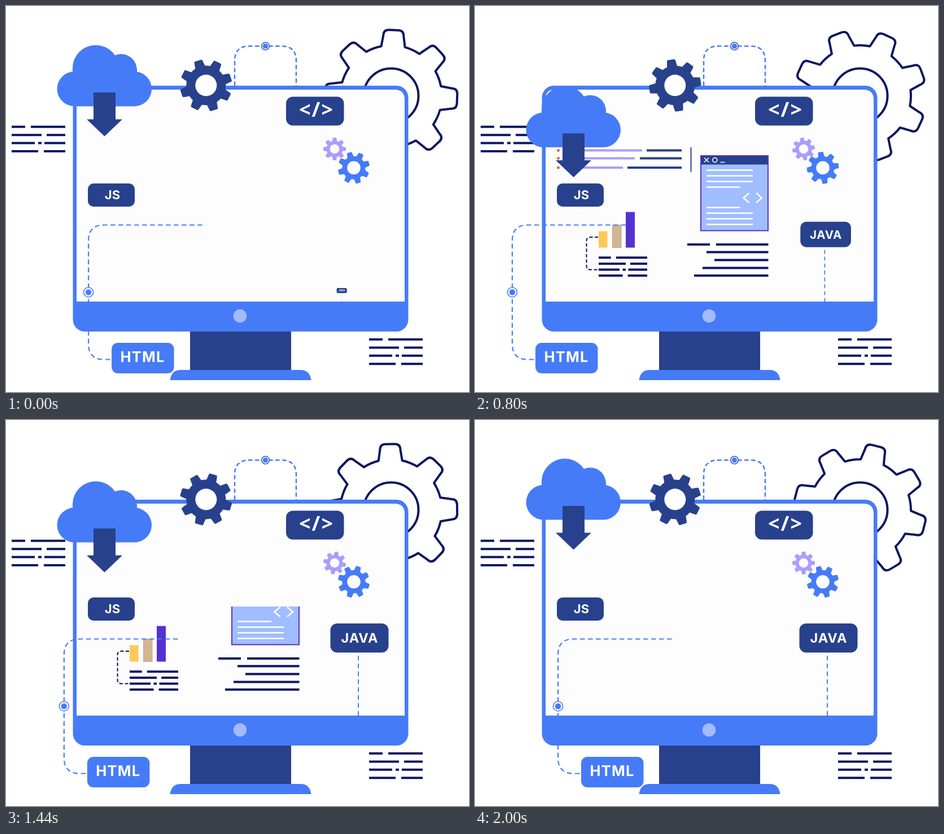
An HTML page for the animation above (2.04 s loop, 820 px wide and 683 px high).

```html
<!DOCTYPE html>
<html lang="en">
<head>
<meta charset="utf-8">
<title>Code monitor</title>
<style>
  html, body { margin: 0; width: 100%; height: 100%; overflow: hidden; background: #fff; }
  svg { display: block; width: 820px; height: 683px; }
  text { font-family: Inter, "Open Sans", sans-serif; font-weight: 700; fill: #fff; text-anchor: middle; }
  .blue { fill: #467bf8; }
  .dark { fill: #28418c; }
  .navy { stroke: #0b1560; fill: none; }
  .wire { stroke: #467bf8; fill: none; }
  .bars { stroke-width: 4; fill: none; }
  .white { stroke: #fff; fill: none; }
</style>
</head>
<body>
<svg viewBox="0 0 820 683">
  <defs>
    <clipPath id="screen"><rect x="125" y="148" width="581" height="375"/></clipPath>
    <clipPath id="wipe"><rect id="wipeBox" x="125" y="522" width="581" height="400"/></clipPath>
  </defs>

  <path id="bigGear" class="navy" stroke-width="4" stroke-linejoin="round"/>
  <circle class="navy" cx="682" cy="159" r="48.5" stroke-width="4"/>

  <path class="wire" stroke-width="2.5" stroke-dasharray="7.5 4.5" d="M405 141V97Q405 71 431 71H488Q514 71 514 97V141"/>
  <circle cx="459.5" cy="71" r="6.8" fill="#fff" stroke="#3157b5" stroke-width="1.6"/>
  <circle class="blue" cx="459.5" cy="71" r="4.6"/>

  <!-- monitor -->
  <rect class="dark" x="326" y="570" width="179" height="76"/>
  <path class="blue" d="M290.500 662Q293 644 309 644H522Q538 644 540.500 662Z"/>
  <rect class="blue" x="118.500" y="141" width="594" height="435" rx="21"/>
  <path fill="#fdfdfe" d="M125 523V164Q125 148 141 148H688Q706 148 706 166V523Z"/>
  <circle cx="414.500" cy="548.500" r="11.800" fill="#a3bbfb"/>

  <path id="leftLines" class="navy bars"/>
  <path id="rightLines" class="navy bars"/>

  <!-- screen content -->
  <g clip-path="url(#wipe)">
    <g fill="#cf6a55">
      <circle cx="147.500" cy="255.500" r="2.500"/><circle cx="147.500" cy="269.500" r="2.500"/><circle cx="147.500" cy="286" r="2.500"/>
    </g>
    <path class="bars" stroke="#ab9cff" d="M160 255.500H296M160 269.500H283M160 286H262"/>
    <path class="bars" stroke="#28418c" d="M304 255.500H366M292 269.500H366M270 286H366"/>
    <path stroke="#28418c" stroke-width="2" d="M382.500 250V293.500"/>

    <rect x="400" y="265" width="119" height="132.500" fill="#a0bdff"/>
    <rect class="dark" x="400" y="265" width="119" height="15.500"/>
    <rect x="400" y="265" width="119" height="132.500" fill="none" stroke="#5332d1" stroke-width="2"/>
    <path class="white" stroke-width="1.600" d="M406 268.500L414 276.500M414 268.500L406 276.500M434.500 276.500H442.500"/>
    <circle class="white" cx="424.800" cy="272.500" r="4" stroke-width="1.600"/>
    <path class="white" stroke-width="2.600" d="M410 290.500H492M410 300.500H492M410 310.500H492M410 320.500H470M410 356.500H470M410 366.500H492M410 376.500H492M410 386.500H492"/>
    <path class="white" stroke-width="2.600" d="M485.500 331L475.500 339.500L485.500 348M498 331L508 339.500L498 348"/>

    <rect x="219" y="398.500" width="15.500" height="29" fill="#ffc857"/>
    <rect x="243.500" y="387.500" width="15.500" height="40" fill="#d3b58f" stroke="#b59a99" stroke-width=".8"/>
    <rect x="267" y="364.500" width="16" height="63" fill="#5332d1"/>
    <path class="navy" stroke-width="2" stroke-dasharray="6 3.500" d="M218 409H204Q197.500 409 197.500 416V460Q197.500 466.500 204 466.500H219"/>
    <path id="chartLines" class="navy bars"/>
    <path class="navy bars" d="M376 422H416M427 422H519.500M410 435.500H519.500M424 449.500H519.500M403 463.500H519.500M388 477H519.500"/>
  </g>

  <g clip-path="url(#screen)">
    <g id="java">
      <path class="wire" stroke-width="2" stroke-dasharray="8 6" d="M624 417V530"/>
      <rect class="dark" x="574.500" y="360" width="103" height="51.500" rx="12"/>
      <text x="626.500" y="394.300" font-size="23.500" letter-spacing=".9">JAVA</text>
    </g>
  </g>

  <path id="darkGear" class="dark"/>
  <circle cx="354.300" cy="140.500" r="19" fill="#fff"/>
  <path id="lilacGear" fill="#ab9cff"/>
  <circle cx="582" cy="253" r="8.300" fill="#fdfdfe"/>
  <path id="blueGear" class="blue"/>
  <circle cx="616" cy="286.300" r="11.800" fill="#fdfdfe"/>

  <rect class="dark" x="496" y="160.500" width="102.500" height="51" rx="12"/>
  <text x="550" y="196" font-size="36" letter-spacing="2" style="font-family:'Open Sans',sans-serif">&lt;/&gt;</text>

  <g id="html">
    <path class="wire" stroke-width="2.200" stroke-dasharray="8.500 5.500" d="M348 387.500H174Q146.500 387.500 146.500 415V598Q146.500 625.500 174 625.500H188"/>
    <circle cx="146.500" cy="506.500" r="8.500" fill="#fff" stroke="#467bf8" stroke-width="1.600"/>
    <circle class="blue" cx="146.500" cy="506.500" r="5.200"/>
    <rect class="blue" x="187.500" y="596" width="110.500" height="54" rx="11"/>
    <text x="242.500" y="630" font-size="25.500" letter-spacing="1.200">HTML</text>
  </g>

  <g id="cloud">
    <g class="blue">
      <circle cx="159" cy="110" r="41.200"/><circle cx="204" cy="112.500" r="27.800"/>
      <rect x="90.500" y="115.500" width="167.500" height="61.500" rx="30.700"/>
      <rect x="118" y="110" width="114" height="50"/>
    </g>
    <path class="dark" d="M155 152.500H194V200H206L174.500 230L143 200H155Z"/>
  </g>

  <rect class="dark" x="145" y="314" width="83" height="41" rx="10"/>
  <text x="188.500" y="342" font-size="22">JS</text>
</svg>

<script>
const LOOP = 2040, STEP = 40;
const $ = id => document.getElementById(id);

// Four rows of a text block: [from, to] pairs within a width of 95.
const ROWS = [[0, 24, 34, 95], [0, 53, 62, 95], [0, 41, 47, 53, 58, 95], [0, 47, 57, 95]];
function textBlock(id, x, y, width, gap) {
  const k = width / 95;
  let d = "";
  ROWS.forEach((row, r) => {
    for (let i = 0; i < row.length; i += 2)
      d += `M${x + row[i] * k} ${y + r * gap}H${x + row[i + 1] * k}`;
  });
  $(id).setAttribute("d", d);
}
textBlock("leftLines", 10, 213.8, 95, 14.4);
textBlock("rightLines", 643, 590, 95, 14.4);
textBlock("chartLines", 219, 445.3, 86, 10.6);

// Eight-toothed gear: body radius, tip radius, half widths at foot and tip, corner.
function gear(id, body, tip, foot, top, corner) {
  const y = -Math.sqrt(body * body - foot * foot);
  let d = "";
  for (let i = 0; i < 8; i++) {
    const a = i * Math.PI / 4, c = Math.cos(a), s = Math.sin(a);
    const p = (px, py) => `${(px * c - py * s).toFixed(2)} ${(px * s + py * c).toFixed(2)} `;
    d += (i ? `A${body} ${body} 0 0 1 ` : "M") + p(-foot, y)
      + "L" + p(-top, corner - tip) + "Q" + p(-top, -tip) + p(corner - top, -tip)
      + "L" + p(top - corner, -tip) + "Q" + p(top, -tip) + p(top, corner - tip)
      + "L" + p(foot, y);
  }
  $(id).setAttribute("d", d + `A${body} ${body} 0 0 1 ${-foot} ${y}Z`);
}
gear("bigGear", 90, 117, 21, 18, 10);
gear("darkGear", 35, 46, 9, 7.6, 2.5);
gear("blueGear", 20.5, 28.2, 5.6, 4.6, 1.5);
gear("lilacGear", 14.5, 20, 4, 3.3, 1);

const SWAY = [[0, .005], [320, .256], [520, .581], [800, .936], [930, 1],
  [1120, .915], [1280, .721], [1600, .314], [2000, -.006]];
const TURN = [[0, 2.3], [320, 10.8], [520, 16.3], [800, 24.7], [1280, 40.3], [1600, 48], [2000, 59.2]];

function segment(keys, t) {
  let i = 0;
  while (i < keys.length - 2 && t >= keys[i + 1][0]) i++;
  return i;
}
function linear(keys, t) {
  const i = segment(keys, t), [a, v] = keys[i], [b, w] = keys[i + 1];
  return v + (w - v) * (t - a) / (b - a);
}
function smooth(keys, t) {
  const i = segment(keys, t), [a, v] = keys[i], [b, w] = keys[i + 1];
  const slope = j => j === 0 || j === keys.length - 1 ? 0
    : (keys[j + 1][1] - keys[j - 1][1]) / (keys[j + 1][0] - keys[j - 1][0]);
  const h = b - a, u = (t - a) / h, q = 1 - u;
  return v * (1 + 2 * u) * q * q + w * u * u * (3 - 2 * u)
    + h * (slope(i) * u * q * q - slope(i + 1) * u * u * q);
}
const place = (id, value) => $(id).setAttribute("transform", value);

function draw(t) {
  const sway = smooth(SWAY, t), spin = t * .18;
  place("cloud", `translate(0 ${78 * sway})`);
  place("html", `translate(${-86 * sway} 0)`);
  place("bigGear", `translate(682 159.5) rotate(${linear(TURN, t)})`);
  place("darkGear", `translate(354.3 140.5) rotate(${spin - 18})`);
  place("blueGear", `translate(616 286.3) rotate(${spin - 17})`);
  place("lilacGear", `translate(582 253) rotate(${-spin})`);

  const grow = (1 - Math.cos(Math.PI * Math.min(t / 1080, 1))) / 2;
  place("java", `translate(588 528.5) scale(${.175 + .825 * grow}) translate(-588 -528.5)`);

  const edge = t < 1000 ? 522.4 - .345 * t : 287 + .269 * (t - 1280);
  $("wipeBox").setAttribute("y", Math.max(edge, 200));
}

const start = performance.now();
function tick() {
  const t = (performance.now() - start) % LOOP;
  draw(Math.floor(t / STEP) * STEP);
  requestAnimationFrame(tick);
}
tick();
</script>
</body>
</html>
```
